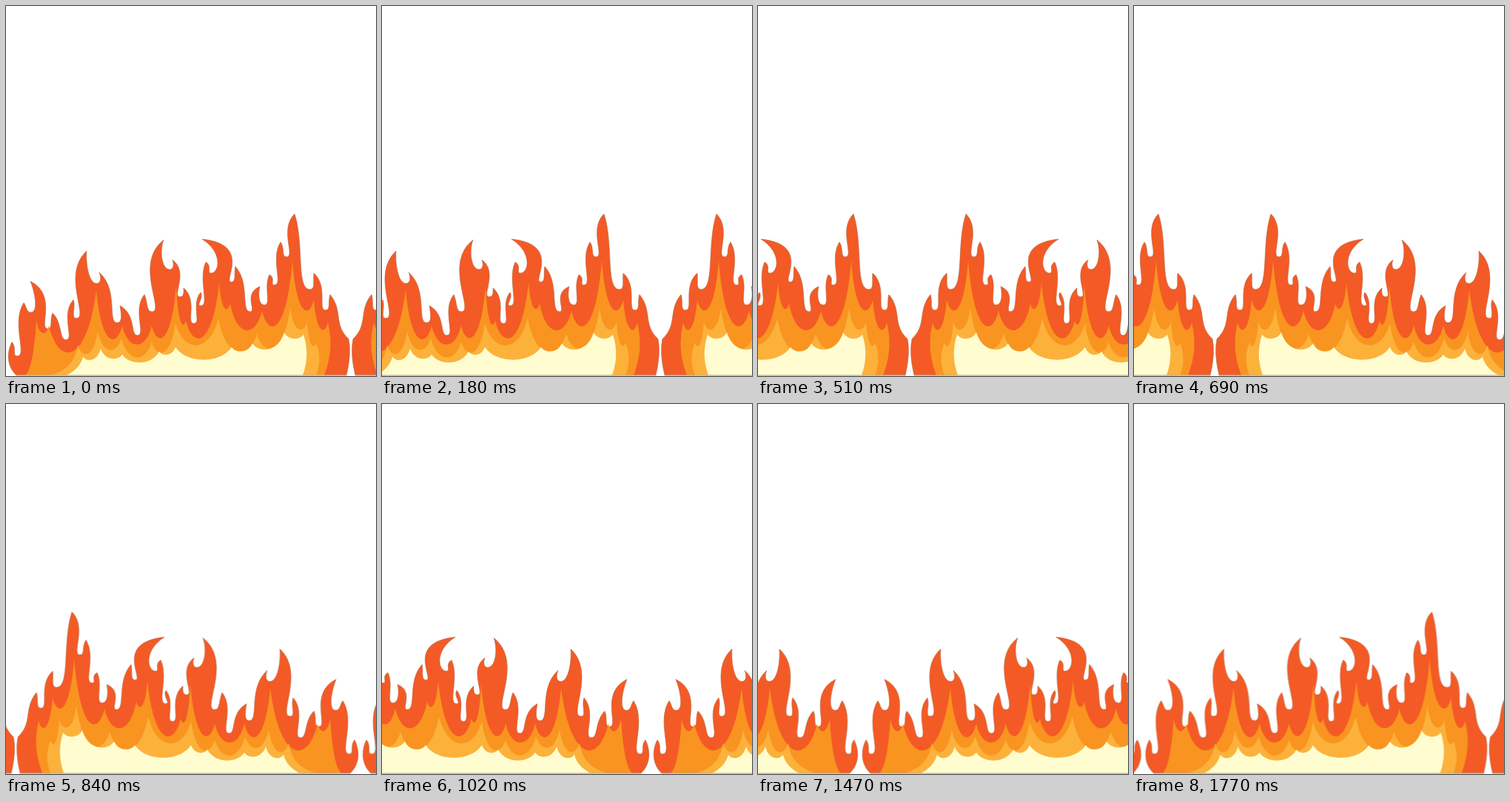
Animation of 500 by 500 pixels, one loop 1.8 s. Source, as an HTML page:

```html
<!DOCTYPE html>
<html lang="en">
<head>
<meta charset="utf-8">
<title>Scrolling fire</title>
<style>
  html, body { margin: 0; width: 100%; height: 100%; overflow: hidden; background: #fff; }
  svg { display: block; width: 100%; height: 100%; }
  #track { animation: scroll 1800ms -1ms infinite; }
  /* The picture advances every 30 ms, at a varying pace. */
  @keyframes scroll {
    0% { transform: translateX(0); animation-timing-function: steps(11); }
    18.3333% { transform: translateX(-165px); animation-timing-function: steps(12); }
    38.3333% { transform: translateX(-357px); animation-timing-function: steps(11); }
    56.6666% { transform: translateX(-568px); animation-timing-function: steps(10); }
    73.3333% { transform: translateX(-731.5px); animation-timing-function: steps(16); }
    100% { transform: translateX(-932px); }
  }
</style>
</head>
<body>
<svg viewBox="0 0 500 500">
  <defs><g id="strip"></g></defs>
  <g id="track">
    <use href="#strip"/>
    <use href="#strip" transform="translate(932) scale(-1 1)"/>
    <use href="#strip" x="932"/>
    <use href="#strip" transform="translate(1864) scale(-1 1)"/>
  </g>
</svg>
<script>
const floor = 499;

// Each lick of flame: tip x, tip y, curl, depth of the pocket on its left.
const licks = [
  [8, 454, 0, floor], [24, 401, -2, 473], [33, 372, 17, 414], [63, 415, 3, 436],
  [91, 397, -4, 451], [109, 331, -12, 422], [126, 360, 9, 375], [154, 405, 9, 428],
  [187, 390, -3, 445], [213, 316, -16, 413], [225, 343, 8, 356], [240, 381, 6, 393],
  [263, 387, -2, 429], [270, 346, 2, 405], [265, 315, 40, 361], [310, 352, 5, 373],
  [343, 379, -10, 413], [356, 363, 2, 404], [371, 319, -1, 377], [390, 281, -6, 339],
  [416, 361, 6, 383], [438, 390, 4, 411]
].map(([x, y, curl, dip]) => ({ x, y, curl, dip }));

const pocketRadius = height => 4 + 0.15 * height;

// Control point that bulges one side of a tip outwards and bends it with the curl.
function bulge(tip, side, dip) {
  const height = dip - tip.y;
  const outer = tip.curl * side > 0;
  const x = tip.x + side * pocketRadius(height) + tip.curl * (outer ? 1.4 : 1);
  const y = tip.y + 0.4 * height - (outer ? 0.4 * Math.abs(tip.curl) : 0);
  return `${x} ${y}`;
}

function flamePath() {
  let d = `M14 ${floor}C2 488 0 470 ${licks[0].x} ${licks[0].y}`;
  for (let i = 1; i < licks.length; i++) {
    const from = licks[i - 1], to = licks[i], { dip } = to;
    const x = to.x - 8 + to.curl / 2;
    const left = x - pocketRadius(dip - from.y);
    const right = x + pocketRadius(dip - to.y);
    d += `C${bulge(from, 1, dip)} ${left} ${dip} ${x} ${dip}`;
    d += `C${right} ${dip} ${bulge(to, -1, dip)} ${to.x} ${to.y}`;
  }
  return d + `C456 412 442 430 463 450Q467 470 460 ${floor}Z`;
}

// Sharp cusps joined by hanging curves; wider gaps hang lower.
function scallopPath({ start, end, sag, cusps }) {
  const [firstX, firstY] = cusps[0];
  let d = `M${start} ${floor}Q${firstX - 4} 490 ${firstX} ${firstY}`;
  for (let i = 1; i < cusps.length; i++) {
    const [x0, y0] = cusps[i - 1], [x1, y1] = cusps[i];
    const gap = x1 - x0, low = Math.max(y0, y1) + sag * gap;
    d += `C${x0 + 0.2 * gap} ${low} ${x1 - 0.2 * gap} ${low} ${x1} ${y1}`;
  }
  const [lastX, lastY] = cusps.at(-1);
  return d + `Q${lastX + 9} ${(lastY + floor) / 2} ${end} ${floor}Z`;
}

const inner = [
  { fill: '#f99420', start: 26, end: 430, sag: 0.85, cusps: [
    [41, 425], [58, 432], [122, 384], [157, 432], [197, 432], [230, 378], [243, 425],
    [288, 374], [303, 402], [346, 412], [387, 344], [416, 397], [435, 428]] },
  { fill: '#fcb13b', start: 60, end: 419, sag: 0.7, cusps: [
    [97, 458], [124, 440], [156, 449], [197, 454], [229, 429], [287, 422],
    [339, 443], [384, 408], [407, 427], [419, 455]] },
  { fill: '#fffdd0', start: 82, end: 401, sag: 0.3, cusps: [
    [104, 474], [128, 463], [157, 471], [207, 467], [229, 461], [305, 461],
    [333, 456], [376, 441], [402, 444]] }
];

const strip = document.getElementById('strip');
function addPath(attrs) {
  const path = document.createElementNS('http://www.w3.org/2000/svg', 'path');
  for (const name in attrs) path.setAttribute(name, attrs[name]);
  strip.append(path);
}

addPath({ d: flamePath(), fill: '#f45a25', stroke: '#b0694a', 'stroke-width': 0.6 });
for (const layer of inner) addPath({ d: scallopPath(layer), fill: layer.fill });
addPath({ d: `M14 ${floor}H460`, stroke: '#b9b0a4' });
</script>
</body>
</html>
```
